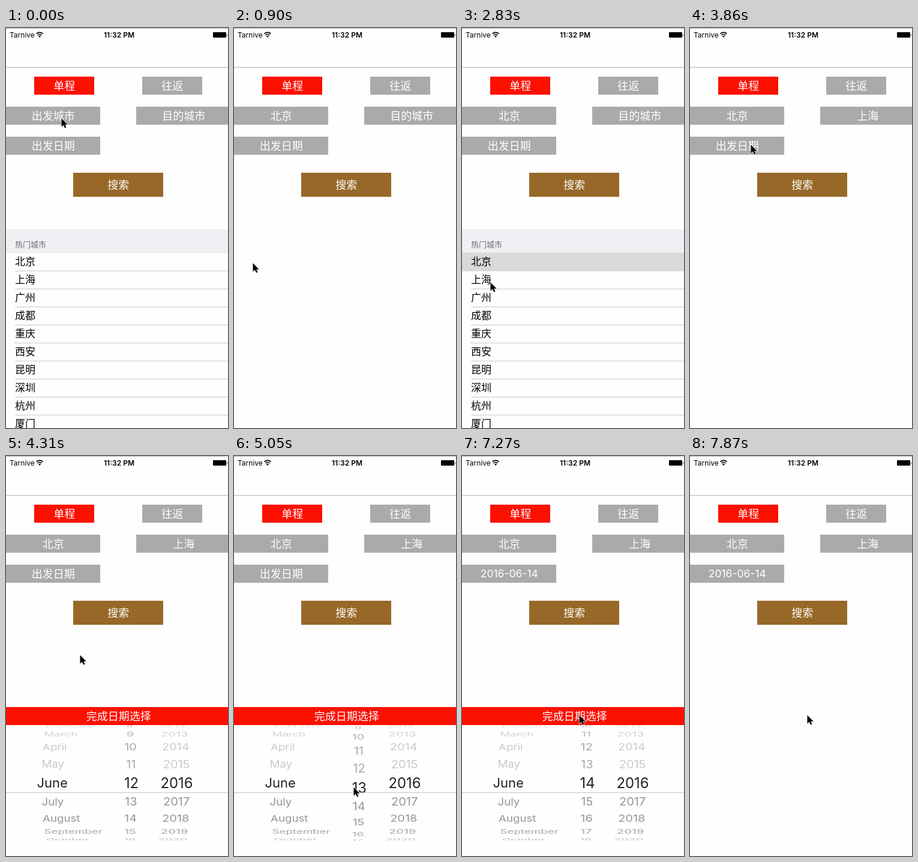
An HTML page that plays this animation: 370 px wide and 666 px high, repeating every 8000 ms.

```html
<!DOCTYPE html>
<html lang="zh-Hans">
<head>
<meta charset="utf-8">
<title>搜索</title>
<style>
  html, body { margin: 0; width: 100%; height: 100%; overflow: hidden; background: #fefefe; }
  svg { display: block; width: 100vw; height: 100vh; }
  text { font-family: Inter, "Noto Sans CJK SC", "Noto Sans CJK", sans-serif; white-space: pre; }
</style>
</head>
<body>
<svg id="stage" viewBox="0 0 370 666" xmlns="http://www.w3.org/2000/svg">
  <rect width="370" height="666" fill="#fefefe"/>
  <path d="M0 .5H370M0 65.5H370" stroke="#b4b4b4"/>
  <g id="status"></g>
  <path d="M50.5 9.6a8 8 0 0 1 11 0M52.5 12a5 5 0 0 1 7 0" fill="none" stroke="#000" stroke-width="1.6"/>
  <path d="M56 16l-2-2.2a2.9 2.9 0 0 1 4 0z"/>
  <rect x="345" y="7" width="22" height="9" rx="1"/>
  <path d="M368 9.5q1.6 2 0 4z"/>
  <g id="form"></g>
  <g id="cities"></g>
  <g id="picker"></g>
  <g id="cursor">
    <path d="M1 1.5V16.5L4.4 13.4 6.6 18 9 17 7 12.4H11.5Z" opacity=".2"/>
    <path d="M.5 .5V14.6L3.8 11.6 6 16.6 8.4 15.6 6.3 10.8H10.6Z" stroke="#fff" stroke-width="1.3" paint-order="stroke"/>
  </g>
</svg>
<script>
const LOOP = 8000, TICK = 148.4;
const RED = '#fc1000', GRAY = '#aaa', BROWN = '#976827';
const CITIES = '北京 上海 广州 成都 重庆 西安 昆明 深圳 杭州 厦门'.split(' ');
const MID = 'text-anchor="middle"';

// Ticks at which the screen changes
const AT = { from: 6, open: 13, to: 20, picker: 27, drag: 33, flick: 37, date: 41, done: 51 };

// Cursor moves: where to, from which tick, for how many, sideways bow
const HOME = { x: 92, y: 150 };
const MOVES = [
  { x: 31, y: 391, at: 0, n: 4, bow: -20 },
  { x: 296, y: 146, at: AT.from, n: 6 },
  { x: 47, y: 423, at: AT.open, n: 6 },
  { x: 101, y: 194, at: AT.to, n: 6 },
  { x: 163, y: 575, at: 28, n: 5 },
  { x: 211, y: 543, at: AT.drag, n: 2 },
  { x: 195, y: 431, at: 44, n: 5, bow: 36 }
];

const $ = id => document.getElementById(id);

// Ease-out progress of a step that starts at tick `at` and takes n ticks
function ease(k, at, n) {
  const u = Math.min(1, Math.max(0, (k - at) / n));
  return 1 - (1 - u) ** 2;
}

function pointer(k) {
  let { x, y } = HOME;
  for (const m of MOVES) {
    const u = ease(k, m.at, m.n);
    x += (m.x - x) * u + (m.bow || 0) * Math.sin(Math.PI * u);
    y += (m.y - y) * u;
  }
  return [Math.round(x), Math.round(y)];
}

const rect = (x, y, w, h, fill) =>
  `<rect x="${x}" y="${y}" width="${w}" height="${h}" fill="${fill}"/>`;

const text = (s, x, y, size, fill, more = '') =>
  `<text x="${x}" y="${y + size * .37}" font-size="${size}" fill="${fill}" ${more}>${s}</text>`;

const button = (s, x, y, w, h, fill, size = 18) =>
  rect(x, y, w, h, fill) + text(s, x + w / 2 + .3, y + h / 2, size, '#fff', MID);

function form(k) {
  const dated = k >= AT.date;
  return button('单程', 47, 81, 100, 30, RED) +
    button('往返', 227, 81, 100, 30, GRAY) +
    button(k < AT.from ? '出发城市' : CITIES[0], 0, 131, 157, 30, GRAY) +
    button(k < AT.to ? '目的城市' : CITIES[1], 217, 131, 158, 30, GRAY) +
    button(dated ? '2016-06-14' : '出发日期', 0, 181, 157, 30, GRAY, dated ? 17.5 : 18) +
    button('搜索', 112, 241, 150, 40, BROWN);
}

function cities(k) {
  const again = k >= AT.open && k < AT.to;
  if (k >= AT.from && !again) return '';
  const rows = CITIES.map((city, i) => {
    const y = 375 + i * 30;
    const back = again && i === 0 ? rect(0, y - 1, 370, 31, '#d9d9d9') : rect(15, y + 29, 355, 1, '#c8c7cc');
    return back + text(city, 15, y + 14.2, 17, '#000');
  });
  return rect(0, 335, 370, 40, '#efeff4') + text('热门城市', 15, 360, 13, '#6d6d72') + rows.join('');
}

// One column of rows laid on a cylinder
function wheel(value, label, x, big, small, above, more) {
  let out = '';
  for (let i = Math.ceil(value - 4.6); i <= value + 4.6; i++) {
    const d = i - value, angle = d * .33;
    const mid = Math.abs(d) < .5;
    const fill = mid ? '#222' : d < 0 ? above : '#969696';
    const y = 544 + 97 * Math.sin(angle);
    const squash = Math.max(.05, Math.cos(angle));
    const fade = Math.min(1, .4 + squash * .8);
    out += `<g transform="translate(${x(d, mid)} ${y}) scale(1 ${squash})" opacity="${fade}">` +
      text(label(i), 0, 0, mid ? big : small, fill, more) + '</g>';
  }
  return out;
}

const month = i => new Date(2016, i - 1).toLocaleString('en', { month: 'long' });

function picker(k) {
  if (k < AT.picker || k >= AT.done) return '';
  const day = 12 + ease(k, AT.drag, 2) + ease(k, AT.flick, 3);
  return wheel(6, month, (d, mid) => mid ? 51.5 : 59 + d * d / 2, 22, 18.7, '#cacaca', '') +
    wheel(day, i => i, d => 209 - Math.abs(d) * .7, 23.8, 20, '#a6a6a6', MID) +
    wheel(2016, i => i, d => 284.5 - .42 * d * d, 23.8, 20, '#cacaca', MID) +
    rect(0, 560, 370, 1, '#c6c6c6') +
    button('完成日期选择', 0, 418, 375, 30, RED);
}

$('status').innerHTML = text('Tarnive', 6, 11.5, 12, '#000') +
  text('11:32 PM', 188.5, 11.5, 12, '#000', MID + ' font-weight="600"');

let last = -1;
function draw(t) {
  const k = Math.floor((t + 8) / TICK);
  if (k === last) return;
  last = k;
  $('form').innerHTML = form(k);
  $('cities').innerHTML = cities(k);
  $('picker').innerHTML = picker(k);
  $('cursor').setAttribute('transform', `translate(${pointer(k)})`);
}

const start = performance.now();
function loop() {
  draw((performance.now() - start) % LOOP);
  requestAnimationFrame(loop);
}
loop();
</script>
</body>
</html>
```
